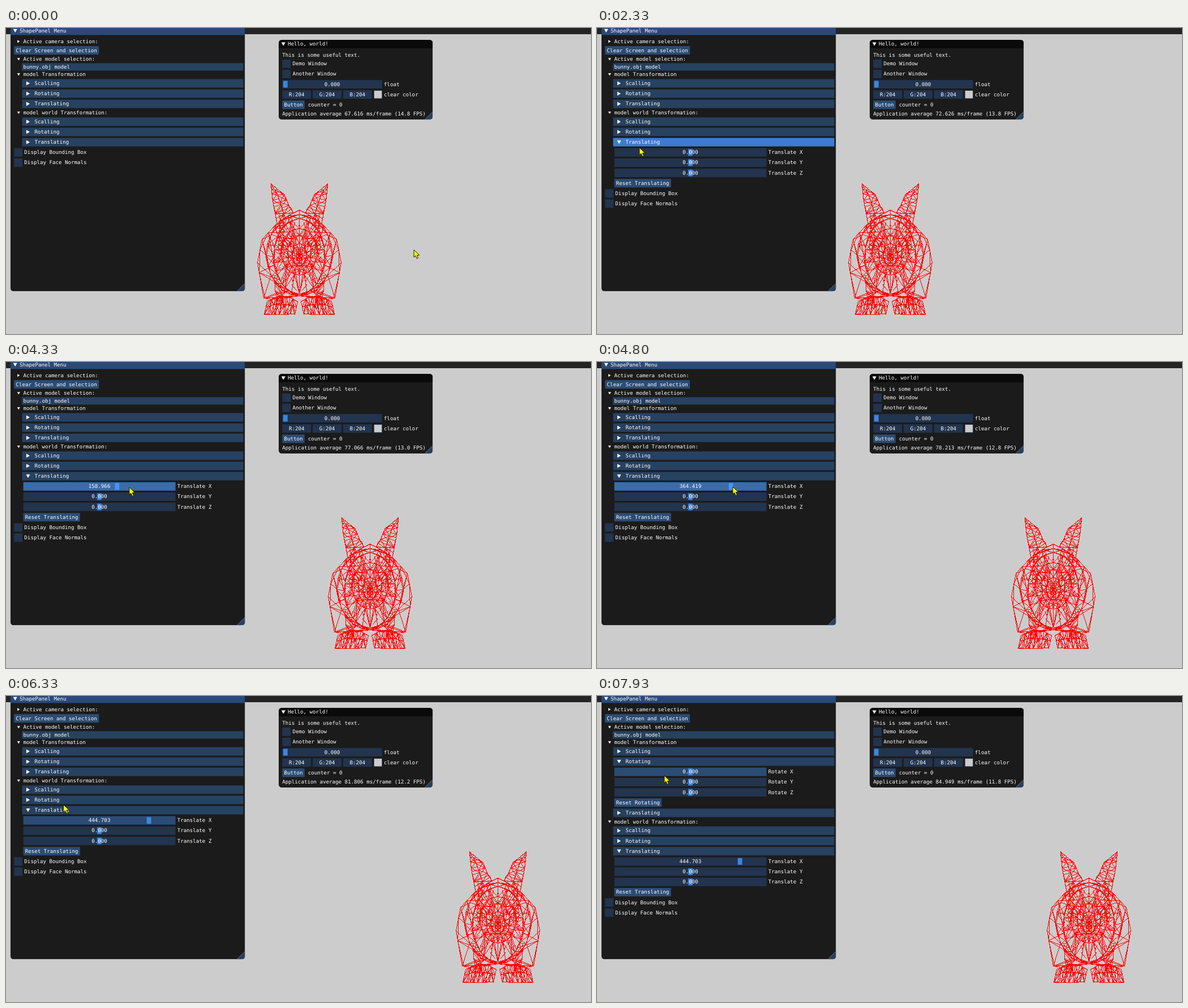
An HTML page with a canvas that plays this animation: 1034 by 542 pixels, repeating every 8000 ms.

```html
<!DOCTYPE html>
<html lang="en">
<head>
<meta charset="utf-8">
<title>Mesh panel</title>
<style>
html, body { margin: 0; width: 100%; height: 100%; overflow: hidden; background: #ccc; }
canvas { display: block; }
</style>
</head>
<body>
<canvas id="stage" width="1034" height="542"></canvas>
<script>
const ctx = document.getElementById('stage').getContext('2d');
const LOOP = 8000, TICKS = 120;
const S = 1034 / 1310;           // interface scale
const CW = 7 * S;                // character advance
const FRAME = 19 * S, LINE = 13 * S, GAP = 4 * S, PAD = 4 * S;
const INSET = 2 * S, GRAB = 10 * S;
const SLIDER = { x: 30.6, w: 269 };
const SPAN = 1310;               // slider range, centred on zero

const C = {
  back: '#cccccc', bar: '#242424', win: '#1b1b1b', title: '#294a7a', titleOff: '#0a0a0a',
  header: '#274160', hover: '#3a7dcd', active: '#4296fa', button: '#2b4c74',
  frame: '#22344e', frameHover: '#2b4c74', frameActive: '#356db0',
  grab: '#3d85e0', grip: '#25405f', edge: 'rgba(110,110,128,.5)', text: '#ffffff', mesh: '#ff0000'
};

// Pointer stops and frame cost, in ticks of 1/15 s
const PATH = [
  [0, 721, 393], [2, 341, 305], [6, 150, 240], [7, 95, 193.5], [14, 74, 193.5], [23, 64, 193.5],
  [27, 72, 201], [34, 74.5, 206], [35, 75, 212], [37, 80, 215], [48, 95, 215], [56, 165.1, 218],
  [60, 166, 219], [64, 196.4017, 220], [65, 218, 222], [72, 240, 221], [81, 252.6656, 219],
  [84, 252.6656, 219], [94, 110, 215], [97, 85, 148], [103, 79, 131], [105, 79, 131],
  [109, 79, 118], [116, 85, 118], [119, 119, 141]
];
const COST = [[0, 67.616], [35, 72.626], [56, 75.392], [65, 77.066], [82, 79.851], [103, 83.009], [119, 84.949]];
const OPEN_MOVE = 28, OPEN_TURN = 112, DRAG = 58, DROP = 84;

const mix = (a, b, f) => a + (b - a) * f;

function track(keys, t) {
  const i = Math.max(1, keys.findIndex(k => k[0] >= t));
  const a = keys[i - 1], b = keys[i];
  const f = (t - a[0]) / (b[0] - a[0]);
  return a.slice(1).map((v, j) => mix(v, b[j + 1], f));
}

// The interface reacts one tick after the pointer
const seen = t => track(PATH, Math.max(0, t - 1));
const pressed = t => t === OPEN_MOVE - 1 || t === OPEN_TURN - 1 || (t >= DRAG && t < DROP);

function dragValue(t) {
  if (t < DRAG) return 0;
  const [x] = seen(Math.min(t, DROP));
  return (x - SLIDER.x - SLIDER.w / 2) / (SLIDER.w - 2 * INSET - GRAB) * SPAN;
}

function box(x, y, w, h, color) {
  ctx.fillStyle = color;
  ctx.fillRect(x, y, w, h);
}

function label(s, x, cy, align = 'left') {
  ctx.fillStyle = C.text;
  ctx.textAlign = align;
  ctx.fillText(s, x, cy + 2.9);
}

function poly(points, color) {
  ctx.beginPath();
  points.forEach(p => ctx.lineTo(p[0], p[1]));
  ctx.closePath();
  ctx.fillStyle = color;
  ctx.fill();
}

function arrow(x, y, open, scale = 1) {
  const r = 5.2 * S * scale, a = .75 * r, b = .866 * r;
  poly(open ? [[x, y + a], [x - b, y - a], [x + b, y - a]]
            : [[x + a, y], [x - a, y + b], [x - a, y - b]], C.text);
}

function windowBox(x, y, w, h, title, color) {
  ctx.save();
  ctx.beginPath();
  ctx.roundRect(x, y, w, h, 7 * S);
  ctx.clip();
  box(x, y, w, h, C.win);
  box(x, y, w, FRAME, color);
  poly([[x + w, y + h - 14], [x + w, y + h], [x + w - 14, y + h]], C.grip);
  ctx.strokeStyle = C.edge;
  ctx.lineWidth = 2 * S;
  ctx.stroke();
  ctx.restore();
  const cy = y + FRAME / 2;
  arrow(x + 8.3, cy, true);
  label(title, x + 16, cy);
}

function button(s, x, cy) {
  box(x, cy - FRAME / 2, s.length * CW + 2 * PAD, FRAME, C.button);
  label(s, x + PAD, cy);
}

function check(s, x, cy) {
  box(x, cy - FRAME / 2, FRAME, FRAME, C.frame);
  label(s, x + FRAME + PAD, cy);
}

function slider(name, x, w, cy, part, text, state) {
  const bg = { hover: C.frameHover, active: C.frameActive }[state] || C.frame;
  const top = cy - FRAME / 2;
  box(x, top, w, FRAME, bg);
  box(x + INSET + (w - 2 * INSET - GRAB) * part, top + INSET, GRAB, FRAME - 2 * INSET,
    state === 'active' ? C.active : C.grab);
  label(text, x + w / 2, cy, 'center');
  label(name, x + w + PAD, cy);
}

// Row kinds: height, hit range if it reacts, painter
const KINDS = {
  tree: { h: LINE, x: 14.3, w: 405.2, draw(cy, s, open, state) {
    if (state) box(this.x, cy - LINE / 2, this.w, LINE, C[state]);
    arrow(22.3, cy, open, .7);
    label(s, 30.4, cy);
  } },
  header: { h: FRAME, x: 28.5, w: 391, draw(cy, s, open, state) {
    box(this.x, cy - FRAME / 2, this.w, FRAME, C[state || 'header']);
    arrow(39, cy, open);
    label(s, 50.5, cy);
  } },
  slider: { h: FRAME, ...SLIDER, draw(cy, s, value, state) {
    slider(s, this.x, this.w, cy, .5 + value / SPAN, value.toFixed(3), state);
  } },
  select: { h: LINE, draw(cy, s) {
    box(28, cy - 6.5, 391.5, 13.2, C.header);
    label(s, 30.4, cy);
  } },
  button: { h: FRAME, draw(cy, s) { button(s, 14.2, cy); } },
  reset: { h: FRAME, draw(cy, s) { button(s, 30.6, cy); } },
  check: { h: FRAME, draw(cy, s) { check(s, 14.2, cy); } }
};

function section(name, verb, open, value = 0) {
  const rows = [['header', name, open]];
  if (!open) return rows;
  ['X', 'Y', 'Z'].forEach((axis, i) => rows.push(['slider', `${verb} ${axis}`, i ? 0 : value]));
  return rows.concat([['reset', 'Reset ' + name]]);
}

function menu(t, shift) {
  windowBox(7.9, -2.6, 414.5, 468.9, 'ShapePanel Menu', C.title);
  const rows = [
    ['tree', 'Active camera selection:', false],
    ['button', 'Clear Screen and selection'],
    ['tree', 'Active model selection:', true],
    ['select', 'bunny.obj model'],
    ['tree', 'model Transformation', true],
    ...section('Scalling', 'Scale', false),
    ...section('Rotating', 'Rotate', t >= OPEN_TURN),
    ...section('Translating', 'Translate', false),
    ['tree', 'model world Transformation:', true],
    ...section('Scalling', 'Scale', false),
    ...section('Rotating', 'Rotate', false),
    ...section('Translating', 'Translate', t >= OPEN_MOVE, shift),
    ['check', 'Display Bounding Box'],
    ['check', 'Display Face Normals']
  ];
  const [mx, my] = seen(t);
  let y = 18.7;
  for (const [kind, s, arg] of rows) {
    const k = KINDS[kind];
    const hit = k.w && mx >= k.x && mx < k.x + k.w && my >= y && my < y + k.h;
    k.draw(y + k.h / 2, s, arg, hit ? (pressed(t) ? 'active' : 'hover') : '');
    y += k.h + GAP;
  }
}

function hello(ms) {
  const x = 488.3;
  windowBox(482, 21, 272.2, 141.2, 'Hello, world!', C.titleOff);
  label('This is some useful text.', x, 47.6);
  check('Demo Window', x, 63.3);
  check('Another Window', x, 81.4);
  slider('float', x, 176.4, 99.6, 0, '0.000', '');
  ['R', 'G', 'B'].forEach((c, i) => {
    const left = x + i * 53.7;
    box(left, 117.8 - FRAME / 2, 51, FRAME, C.frame);
    label(c + ':204', left + 25.5, 117.8, 'center');
  });
  box(650, 117.8 - FRAME / 2, FRAME, FRAME, C.frame);
  box(650 + S, 117.8 - FRAME / 2 + S, FRAME - 2 * S, FRAME - 2 * S, C.back);
  label('clear color', 668, 117.8);
  button('Button', x, 135.9);
  label('counter = 0', 533.8, 135.9);
  label(`Application average ${ms.toFixed(3)} ms/frame (${(1000 / ms).toFixed(1)} FPS)`, x, 151.8);
}

// Wire mesh: half profiles measured from the axis, joined by triangle strips and mirrored
function buildMesh() {
  const cv = document.createElement('canvas');
  cv.width = 149;
  cv.height = 236;
  const g = cv.getContext('2d');
  g.fillStyle = C.mesh;
  let seed = 11;
  const rnd = () => (seed = seed * 16807 % 2147483647) / 2147483647 - .5;

  function line(a, b) {
    const n = Math.ceil(Math.max(Math.abs(b[0] - a[0]), Math.abs(b[1] - a[1]))) || 1;
    for (let i = 0; i <= n; i++) {
      const x = Math.round(mix(a[0], b[0], i / n)), y = Math.round(mix(a[1], b[1], i / n)) - 274;
      g.fillRect(74 + x, y, 1, 1);
      g.fillRect(74 - x, y, 1, 1);
    }
  }
  const chain = p => p.slice(1).forEach((b, i) => line(p[i], b));
  const curve = (n, f) => Array.from({ length: n + 1 }, (_, i) => f(i / n));
  const ring = (cy, rx, ry) => u => [rx * Math.sin(Math.PI * u), cy - ry * Math.cos(Math.PI * u)];
  const path = p => u => {
    const k = Math.min(Math.floor(u * (p.length - 1)), p.length - 2), f = u * (p.length - 1) - k;
    return [mix(p[k][0], p[k + 1][0], f), mix(p[k][1], p[k + 1][1], f)];
  };
  const between = (p, q) => u => p(u).map((v, i) => mix(v, q(u)[i], .5));
  const shake = (p, j) => p.map((v, i) => i % (p.length - 1) ? [v[0] + rnd() * j, v[1] + rnd() * j] : v);

  function strip(p, q, n, jitter = 0) {
    const a = shake(curve(n, p), jitter), b = shake(curve(n, q), jitter);
    chain(a);
    chain(b);
    a.forEach((v, i) => {
      line(v, b[i]);
      if (i < n) i % 2 ? line(v, b[i + 1]) : line(a[i + 1], b[i]);
    });
  }

  const outline = path([[0, 322], [22, 333], [40, 346], [66, 374], [74, 415], [63, 478], [47, 480]]);
  const rings = [ring(402, 58, 72), ring(404, 45, 67), ring(396, 32, 41), ring(398, 21, 31),
    ring(401, 12, 20), ring(403, 5, 9), ring(403, 1, 2)];
  strip(outline, rings[0], 6);
  strip(outline, rings[1], 7);
  rings.slice(1).forEach((r, i) => strip(rings[i], r, 12 - i, 3));
  strip(rings[1], rings[3], 9, 4);
  strip(rings[2], rings[4], 7, 4);

  const earOut = path([[50, 275], [48, 298], [44, 323], [39, 347]]);
  const earIn = path([[50, 276], [27, 294], [18, 314], [11, 327]]);
  const earMid = between(earOut, earIn);
  strip(earOut, earMid, 7, 2);
  strip(earMid, earIn, 6, 2);
  strip(earOut, earIn, 4, 1);

  strip(path([[36, 332], [35, 400]]), path([[28, 332], [27, 396]]), 9, 4);
  strip(path([[44, 440], [41, 484]]), path([[27, 462], [30, 497]]), 6, 4);

  const foot = v => u => [3 + 5 * v + 54 * u, mix(484 - 10 * Math.sin(Math.PI * u), 506.5, v)];
  strip(foot(0), foot(.45), 8, 3);
  strip(foot(.45), foot(1), 8, 1);
  strip(foot(0), foot(1), 6, 1);

  // Loose edges of the far side
  for (let i = 0; i < 34; i++) {
    const p = ring(400, 48 * Math.sqrt(i / 34), 62 * Math.sqrt(i / 34))(rnd() + .5);
    line(p, [Math.max(0, p[0] + rnd() * 28), p[1] + rnd() * 28]);
  }
  line([0, 322], [0, 471]);
  return cv;
}
const mesh = buildMesh();

function pointer(x, y) {
  const shape = [[0, 0], [0, 13], [3, 10.4], [5.2, 15.4], [7.6, 14.4], [5.4, 9.6], [9.6, 9.2]];
  poly(shape.map(p => [p[0] + x, p[1] + y]), '#ffff00');
  ctx.strokeStyle = '#1a1a00';
  ctx.lineWidth = 1;
  ctx.stroke();
}

function paint(now) {
  const t = Math.floor((now % LOOP) * TICKS / LOOP + .2) % TICKS;
  const shift = dragValue(t);
  ctx.font = CW / .602 + 'px "DejaVu Sans Mono", monospace';
  ctx.textRendering = 'geometricPrecision';
  ctx.textBaseline = 'alphabetic';
  box(0, 0, 1034, 542, C.back);
  box(0, 0, 1034, 11, C.bar);
  ctx.drawImage(mesh, 444 + Math.round(shift * S), 274);
  menu(t, shift);
  hello(track(COST, t)[0]);
  pointer(...track(PATH, t));
}

const start = performance.now();
function loop() {
  paint(performance.now() - start);
  requestAnimationFrame(loop);
}
loop();
</script>
</body>
</html>
```
